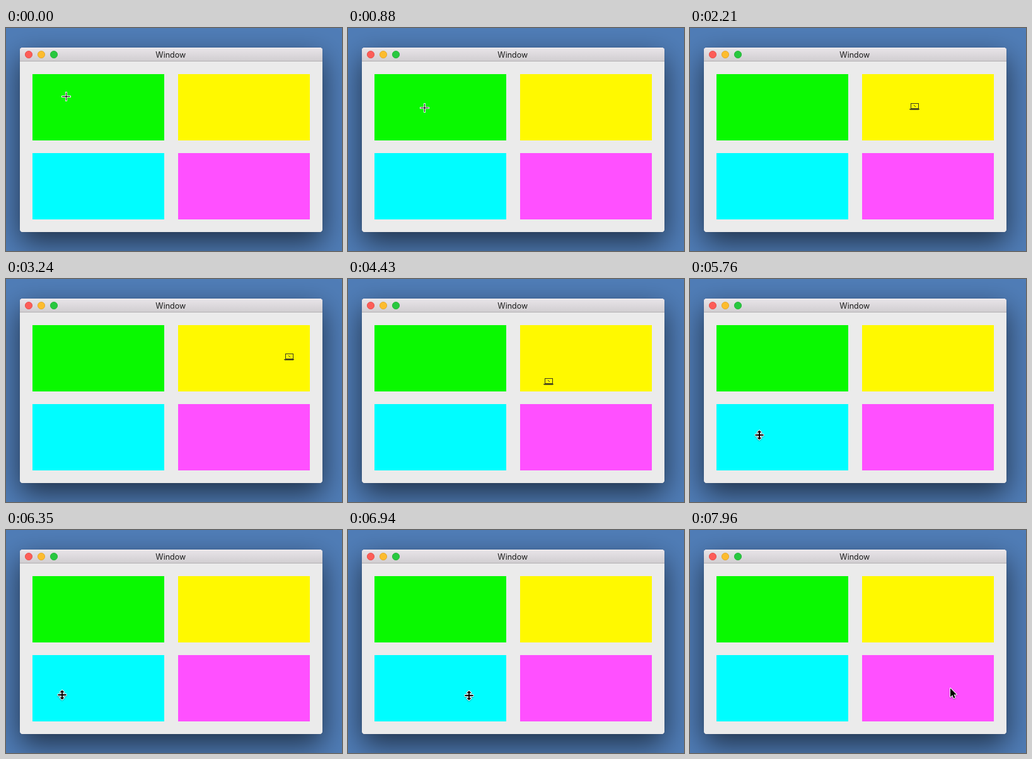
These frames come from a looping animation (533x353 px, 8000 ms). An HTML page with a canvas:

```html
<!DOCTYPE html>
<html lang="en">
<head>
<meta charset="utf-8">
<title>Window cursors</title>
<style>
  html, body { margin: 0; width: 100%; height: 100%; overflow: hidden; background: #507db7; }
  canvas { display: block; }
</style>
</head>
<body>
<canvas id="stage" width="533" height="353"></canvas>
<script>
const LOOP = 8000;
const STEP = 147;
const PANE_W = 209, PANE_H = 105;
const ctx = document.getElementById('stage').getContext('2d');

const panes = [
  { color: '#09f900', cursor: drawCross },
  { color: '#fff900', cursor: drawLaptop },
  { color: '#00fdff', cursor: drawResize },
  { color: '#ff50ff', cursor: drawArrow },
].map((pane, i) => ({ ...pane, x: 42 + 231 * (i % 2), y: 73 + 125 * Math.floor(i / 2) }));

// The pointer moves in steps during these spans and rests between them.
const sweeps = [
  [300, 1320], [1470, 2510], [2650, 3240], [3690, 4730],
  [4880, 5910], [6060, 6940], [7240, 7960],
];

const keys = [
  { t: 150, x: 95, y: 108 },
  { t: 880, x: 121, y: 126 },
  { t: 1320, x: 192, y: 122 },
  { t: 2210, x: 356, y: 124 },
  { t: 2510, x: 356, y: 124 },
  { t: 2950, x: 408, y: 120 },
  { t: 3240, x: 449, y: 123 },
  { t: 3540, x: 449, y: 123 },
  { t: 4430, x: 318, y: 162 },
  { t: 4730, x: 248, y: 192 },
  { t: 5760, x: 110, y: 247 },
  { t: 6200, x: 77, y: 261 },
  { t: 6940, x: 192, y: 262 },
  { t: 7090, x: 192, y: 262 },
  { t: 7960, x: 412, y: 249 },
];

function stepTime(time) {
  const sweep = sweeps.findLast(([from]) => from <= time);
  if (!sweep) return 0;
  const [from, to] = sweep;
  const count = Math.round((to - from) / STEP);
  const gap = (to - from) / count;
  const step = Math.min(count, Math.floor((time - from + 5) / gap));
  return Math.floor((from + step * gap) / 10) * 10;
}

function secant(i, axis) {
  const a = keys[i], b = keys[i + 1];
  return a && b ? (b[axis] - a[axis]) / (b.t - a.t) : 0;
}

// Harmonic mean of the neighbouring slopes: smooth, without overshoot.
function slope(i, axis) {
  const before = secant(i - 1, axis), after = secant(i, axis);
  return before * after > 0 ? 2 * before * after / (before + after) : 0;
}

function position(time, axis) {
  const i = keys.findLastIndex(key => key.t <= time);
  if (i < 0) return keys[0][axis];
  if (i === keys.length - 1) return keys[i][axis];
  const a = keys[i], b = keys[i + 1];
  const span = b.t - a.t;
  const u = (time - a.t) / span, v = 1 - u;
  return Math.round(
    a[axis] * v * v * (1 + 2 * u) + b[axis] * u * u * (1 + 2 * v) +
    span * u * v * (slope(i, axis) * v - slope(i + 1, axis) * u));
}

function fillRect(color, x, y, w, h) {
  ctx.fillStyle = color;
  ctx.fillRect(x, y, w, h);
}

function drawOutlined(points, width) {
  const path = new Path2D();
  points.forEach(([x, y]) => path.lineTo(x, y));
  path.closePath();
  ctx.save();
  ctx.shadowColor = 'rgba(0,0,0,.35)';
  ctx.shadowBlur = 2;
  ctx.shadowOffsetY = 1;
  ctx.lineJoin = 'round';
  ctx.lineWidth = width;
  ctx.strokeStyle = '#fff';
  ctx.stroke(path);
  ctx.restore();
  ctx.fillStyle = '#000';
  ctx.fill(path);
}

function drawCross() {
  fillRect('#fff', -1, -7, 3, 15);
  fillRect('#fff', -7, -1, 15, 3);
  fillRect('#000', 0, -6, 1, 13);
  fillRect('#000', -6, 0, 13, 1);
}

function drawLaptop() {
  const ink = '#3d3b22';
  ctx.strokeStyle = ink;
  ctx.lineWidth = 1;
  ctx.strokeRect(-5.5, -4.5, 12, 8);
  fillRect(ink, -8, 4, 16, 1);
  fillRect(ink, -7, 5, 14, 0.6);
  for (let i = 0; i < 3; i++) fillRect(ink, i - 1, i - 2, 1, 1);
}

function drawResize() {
  const quarter = [[0, -7.5], [3.6, -4], [1, -4], [1, -1], [6.5, -1]];
  const right = [...quarter, ...quarter.map(([x, y]) => [x, -y]).reverse()];
  const left = right.map(([x, y]) => [-x, y]).reverse();
  drawOutlined([...right, ...left], 1.8);
}

function drawArrow() {
  ctx.translate(1, 1);
  drawOutlined([[0, 0.5], [0, 14.2], [3.2, 11.2], [5.4, 16.2], [7.6, 15.2], [5.5, 10.4], [9.8, 10.4]], 2);
}

function drawLight(x, fill, rim) {
  ctx.beginPath();
  ctx.arc(x, 42, 5.6, 0, Math.PI * 2);
  ctx.fillStyle = fill;
  ctx.fill();
  ctx.lineWidth = 0.8;
  ctx.strokeStyle = rim;
  ctx.stroke();
}

function drawWindow() {
  fillRect('#507db7', 0, 0, 533, 353);

  ctx.save();
  ctx.beginPath();
  ctx.roundRect(22, 31, 480, 292, 4.5);
  ctx.save();
  ctx.shadowColor = 'rgba(0,0,0,.6)';
  ctx.shadowBlur = 46;
  ctx.shadowOffsetY = 17;
  ctx.fillStyle = '#ebebeb';
  ctx.fill();
  ctx.restore();
  ctx.strokeStyle = 'rgba(0,0,0,.12)';
  ctx.lineWidth = 1;
  ctx.stroke();
  ctx.clip();
  fillRect('#ebebeb', 22, 31, 480, 292);
  const bar = ctx.createLinearGradient(0, 31, 0, 52);
  bar.addColorStop(0, '#e9e5e9');
  bar.addColorStop(1, '#d1ced1');
  fillRect(bar, 22, 31, 480, 21);
  fillRect('#f3f0f3', 22, 31, 480, 1);
  fillRect('#b3b0b3', 22, 52, 480, 1);
  ctx.restore();

  drawLight(36, '#fd5d58', '#e1453f');
  drawLight(56, '#fdbc2e', '#dfa023');
  drawLight(76, '#28c83f', '#1bac2c');

  ctx.font = '12.5px Inter, sans-serif';
  ctx.textAlign = 'center';
  ctx.fillStyle = '#1c1c1c';
  ctx.fillText('Window', 261.3, 47);

  for (const { x, y, color } of panes) fillRect(color, x, y, PANE_W, PANE_H);
}

function cursorAt(x, y) {
  const pane = panes.find(p => x >= p.x && x < p.x + PANE_W && y >= p.y && y < p.y + PANE_H);
  return pane ? pane.cursor : drawArrow;
}

function render(now) {
  const time = stepTime(now % LOOP);
  const x = position(time, 'x'), y = position(time, 'y');
  drawWindow();
  ctx.save();
  ctx.translate(x, y);
  cursorAt(x, y)();
  ctx.restore();
}

function tick() {
  render(performance.now());
  requestAnimationFrame(tick);
}
tick();
</script>
</body>
</html>
```
